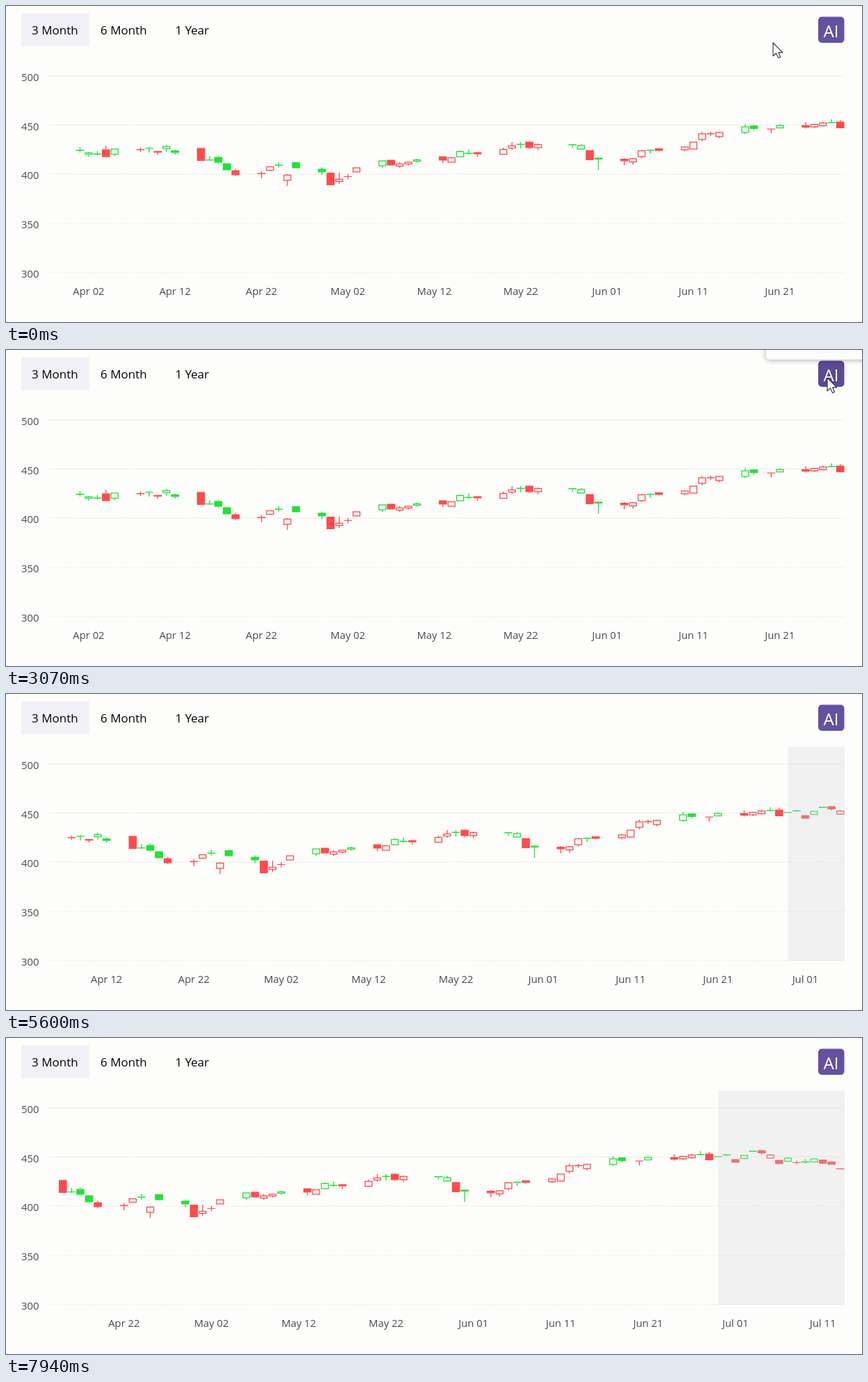
An HTML page for the animation above (8000 ms loop, 1232 px wide and 455 px high).

```html
<!DOCTYPE html>
<html lang="en">
<head>
<meta charset="utf-8">
<title>Stock forecast</title>
<style>
  html, body { margin: 0; width: 100%; height: 100%; overflow: hidden; background: #fdfdfc; }
  svg { display: block; width: 1232px; height: 455px; }
  text { font-family: "Open Sans", "Noto Sans", sans-serif; }
  .tab { font-size: 17px; fill: #050505; }
  .axis { font-size: 14.8px; fill: #4b494f; }
  .grid { stroke: #ebeae7; stroke-dasharray: 3 1; }
  .panel { fill: #fcfcfc; stroke: #dededc; filter: drop-shadow(0 1px 3px rgba(0, 0, 0, .28)); }
  .band { fill: rgba(205, 206, 214, .27); }
</style>
</head>
<body>
<svg viewBox="0 0 1232 455">
  <defs><clipPath id="view"><rect x="20" y="60" width="1191" height="395"/></clipPath></defs>
  <rect x="22" y="10.5" width="98" height="47.5" fill="#f2f1f7"/>
  <text class="tab" x="37" y="41">3 Month</text>
  <text class="tab" x="136" y="41">6 Month</text>
  <text class="tab" x="243.5" y="41">1 Year</text>
  <g id="scale"></g>
  <g id="plot" clip-path="url(#view)"></g>
  <rect id="button" x="1169" y="15.5" width="37.5" height="37.5" rx="5"/>
  <text x="1187.5" y="45" text-anchor="middle" font-size="24" fill="#fff">AI</text>
  <rect id="panel" class="panel" x="1093.5" y="-20" width="160" height="34" rx="5"/>
  <path id="cursor" d="M0 0V19L4.5 15L7.6 21.8L10.6 20.5L7.6 13.9H13.6Z"
        fill="#fff" stroke="#30303a" stroke-width="1.1" stroke-linejoin="round"/>
</svg>
<script>
const LOOP = 8000;
const RIGHT = 1207, PLOT_W = 1144;
const LAST_DAY = 88;                      // days are counted from Apr 01
const FORECAST_AT = 3418, DAY_MS = 319;
const RED = '#ff4b4b', GREEN = '#20e236';
const $ = id => document.getElementById(id);

// Rows: kind, body top, body bottom, wick top, wick bottom.
// Upper case kinds are filled, lower case ones are hollow.
const candles = [];
const run = (day, ...rows) => rows.forEach(([kind, top, bottom, high = top, low = bottom], i) =>
  candles.push({ day: day + i, kind, top, bottom, high, low }));

run(0, ['G', 207, 208.5, 203, 211], ['g', 211.5, 213.5, 210, 217], ['G', 212.5, 214, 209, 215],
  ['R', 206.5, 217.5, 201.5], ['g', 206, 213.5, 206, 216]);
run(7, ['R', 206, 207.5, 204, 210], ['G', 204.3, 205.5, 203, 211], ['R', 209, 211, 208.5, 214],
  ['g', 202.5, 205.5, 200, 210], ['G', 208, 211.5, 206.5, 214]);
run(14, ['R', 204.5, 223], ['G', 221, 222.3, 216, 223], ['G', 217.5, 225.5, 215.5, 227],
  ['G', 226.5, 236.5], ['R', 236.5, 243.5, 234.5, 245]);
run(21, ['R', 240.5, 242, 237.5, 248], ['r', 231.5, 236.5, 231, 237.5], ['G', 228.5, 230, 224.5, 232.5],
  ['r', 243.5, 251, 242, 259], ['G', 225, 233.5]);
run(28, ['G', 234.5, 239.5, 232.5, 243.5], ['R', 240, 258], ['r', 249.5, 252.5, 240, 256],
  ['R', 245, 246, 242, 249.5], ['r', 233, 239]);
run(35, ['g', 223, 230, 223, 233.5], ['R', 221.5, 229.5], ['r', 227.5, 230.5, 225, 233],
  ['r', 225, 227.5, 224, 229.5], ['g', 221.5, 223.5, 220, 225.5]);
run(42, ['R', 216.5, 222.5, 216.5, 226.5], ['r', 218.5, 225], ['g', 209.5, 217, 208],
  ['G', 211.5, 213, 206.5, 214], ['R', 210.5, 213.5, 210, 217]);
run(49, ['r', 206.5, 213.5, 204], ['r', 201.5, 204.5, 196, 207], ['G', 198.5, 200, 196, 205],
  ['R', 195.5, 204.5, 195, 206], ['r', 199.5, 204, 198, 207.5]);
run(57, ['G', 199, 200.5, 199, 204], ['g', 201, 206, 198.5], ['R', 207.5, 222], ['G', 218.5, 221, 218, 236]);
run(63, ['R', 220, 223.5, 219, 229.5], ['r', 220, 224.5, 219, 228.5], ['r', 208.5, 217, 207.5, 219.5],
  ['G', 207, 208.5, 206.5, 213], ['R', 205, 208.5, 205, 209.5]);
run(70, ['r', 203, 207, 202, 209], ['r', 196, 206], ['r', 184, 192, 181, 195],
  ['R', 183, 184.5, 181, 187], ['r', 182, 188, 181, 190.5]);
run(77, ['g', 174, 182, 170, 184.5], ['G', 172, 177, 172, 179]);
run(80, ['R', 176.5, 177.7, 176.5, 183.5], ['g', 172, 175.5, 170.5, 176]);
run(84, ['R', 171.5, 175, 167.5, 176.5], ['r', 170.5, 174, 169.5, 176], ['r', 168.5, 172.5, 166.5, 173.5],
  ['G', 167, 168.5, 163, 169], ['R', 166.5, 176, 164]);
// Forecast
run(89, ['G', 170, 171.2], ['G', 167.5, 169, 167, 170], ['R', 174.5, 179.5], ['g', 169, 173.5],
  ['G', 162.3, 164], ['R', 161.5, 166, 161, 168], ['r', 168.5, 173, 167], ['R', 175.5, 181.5],
  ['g', 173, 177.5, 171.5], ['R', 178.8, 180, 176.5, 182], ['G', 177.5, 179.5, 174.5, 180.5],
  ['g', 174, 178.5], ['R', 175, 181], ['R', 178, 182.5], ['R', 187.7, 189.2]);

const dayName = day => {
  const date = new Date(Date.UTC(2024, 3, 1 + day));
  const month = ['Apr', 'May', 'Jun', 'Jul'][date.getUTCMonth() - 3];
  return `${month} ${String(date.getUTCDate()).padStart(2, '0')}`;
};

function candleMarkup({ kind, top, bottom, high, low }, x) {
  const color = kind.toLowerCase() === 'r' ? RED : GREEN;
  const hollow = kind === kind.toLowerCase();
  const half = hollow ? 5 : 5.8;
  const paint = hollow ? `fill="none" stroke="${color}" stroke-width="1.3"` : `fill="${color}"`;
  return `<path d="M${x} ${high}V${top}M${x} ${bottom}V${low}" stroke="${color}" stroke-width="1.3"/>` +
    `<rect x="${x - half}" y="${top}" width="${half * 2}" height="${bottom - top}" ${paint}/>`;
}

function plotMarkup(added) {
  const end = LAST_DAY + added;
  const count = added < 3 ? 92 : 91;      // days in the trailing three months
  const step = PLOT_W / count;
  const xOf = day => RIGHT - (end - day + 0.5) * step;
  const visible = day => day <= end && day > end - count;

  let out = candles.filter(c => visible(c.day)).map(c => candleMarkup(c, xOf(c.day))).join('');
  for (let day = 1; day <= end; day += 10) {
    if (visible(day)) out += `<text class="axis" x="${xOf(day)}" y="415.5" text-anchor="middle">${dayName(day)}</text>`;
  }
  if (added) {
    const x = xOf(LAST_DAY + 1);
    out += `<rect class="band" x="${x}" y="76" width="${RIGHT - x}" height="308"/>`;
  }
  return out;
}

$('scale').innerHTML = [500, 450, 400, 350, 300].map((value, i) => {
  const y = 100.3 + i * 70.9;
  return `<path class="grid" d="M62 ${y}H${RIGHT}"/>` +
    `<text class="axis" x="47.5" y="${y + 7.3}" text-anchor="end">${value}</text>`;
}).join('');

const cursorPath = [[0, 1104, 53], [800, 1138, 47], [1800, 1182, 40], [LOOP, 1182, 40]];
function cursorAt(t) {
  const i = cursorPath.findIndex(p => p[0] > t);
  const [t0, x0, y0] = cursorPath[i - 1], [t1, x1, y1] = cursorPath[i];
  const f = (t - t0) / (t1 - t0);
  return `translate(${x0 + (x1 - x0) * f} ${y0 + (y1 - y0) * f})`;
}

const show = (id, on) => $(id).setAttribute('visibility', on ? 'visible' : 'hidden');
let shown = -1;

function draw(t) {
  const added = t < FORECAST_AT ? 0 : 1 + Math.floor((t - FORECAST_AT) / DAY_MS);
  if (added !== shown) {
    $('plot').innerHTML = plotMarkup(added);
    shown = added;
  }
  const hover = t > 1550 && t < 3700;
  $('button').setAttribute('fill', hover ? '#5c4996' : '#6551a1');
  $('cursor').setAttribute('transform', cursorAt(t));
  show('cursor', t < 3700);
  show('panel', t >= 2200 && t < 4700);
}

const start = performance.now();
function tick() {
  draw((performance.now() - start) % LOOP);
  requestAnimationFrame(tick);
}
tick();
</script>
</body>
</html>
```
